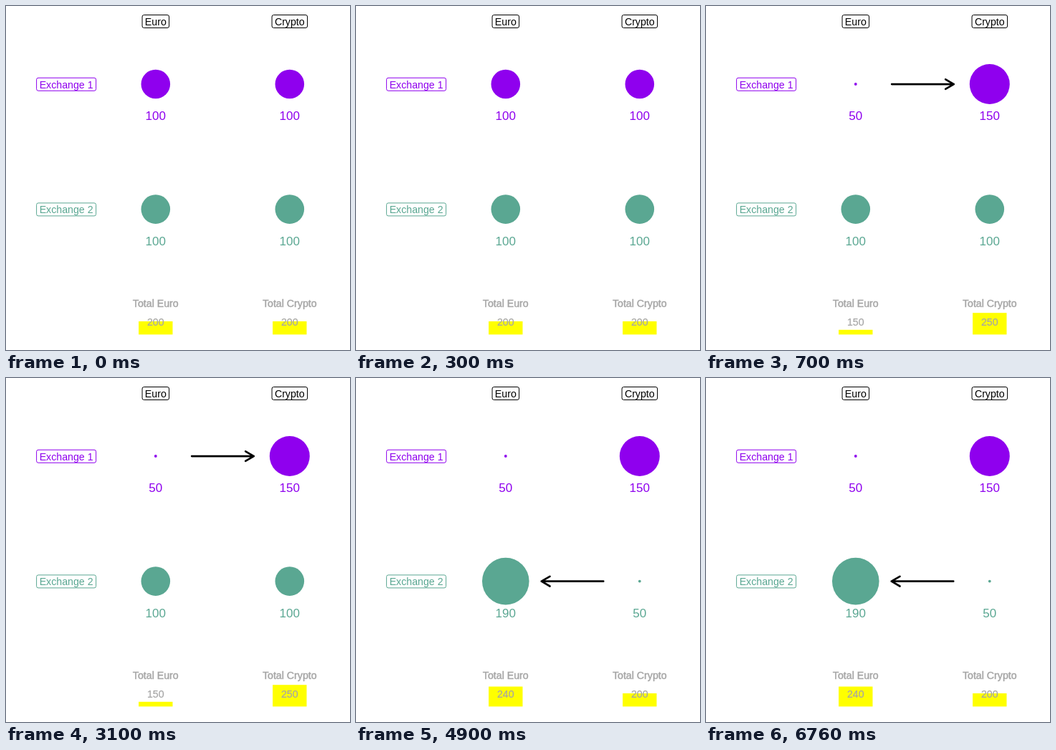
An HTML page that plays this animation: 480x480 px, repeating every 8000 ms.

```html
<!DOCTYPE html>
<html lang="en">
<head>
<meta charset="utf-8">
<style>
html, body { margin: 0; height: 100%; overflow: hidden; background: #fff; }
svg { display: block; width: 480px; height: 480px; }
text { font: 14.2px "Liberation Sans", Arial, sans-serif; text-anchor: middle; }
.amount { font-size: 17px; }
.total { fill: #a6a6a6; stroke: #a6a6a6; stroke-width: .2; }
.heading { stroke-width: .45; }
.arrow { fill: none; stroke-linecap: round; stroke-linejoin: round; }
</style>
</head>
<body>
<svg viewBox="0 0 480 480"><g id="labels"></g><g id="scene"></g></svg>
<script>
const PURPLE = '#8f00ee', TEAL = '#5aa792';
const COLS = [208.8, 395.8];
const ROWS = [{ y: 109, color: PURPLE }, { y: 283.6, color: TEAL }];
const RADIUS = { 50: 1.9, 75: 14.9, 100: 20.3, 125: 24.5, 145: 27.5, 150: 28, 190: 32.8 };

// Amounts: [exchange 1 euro, crypto, exchange 2 euro, crypto]; arrows: 0 off, 1 fading, 2 full
const STATES = [
  { start: 0,    amounts: [100, 100, 100, 100], arrows: [0, 0] },
  { start: 500,  amounts: [75, 125, 100, 100],  arrows: [1, 0] },
  { start: 700,  amounts: [50, 150, 100, 100],  arrows: [2, 0] },
  { start: 4700, amounts: [50, 150, 145, 75],   arrows: [1, 1] },
  { start: 4900, amounts: [50, 150, 190, 50],   arrows: [0, 2] },
];
const LOOP = 8000;

const text = (x, y, str, cls, fill = '') =>
  `<text x="${x}" y="${y}" class="${cls}" ${fill && `fill="${fill}"`}>${str}</text>`;

const tag = (x, y, w, str, color) =>
  `<rect x="${x - w / 2}" y="${y - 9.2}" width="${w}" height="18" rx="2.5" fill="none" stroke="${color}"/>` +
  text(x, y + 5.2, str, '', color);

function arrow(row, level) {
  if (!level) return '';
  const y = ROWS[row].y + .1;
  const [tail, tip, back] = row ? [345.2, 258.8, 270.5] : [259.2, 345.8, 334.2];
  const style = level > 1 ? 'stroke="#000" stroke-width="2.7"' : 'stroke="#101010" stroke-width="2.3"';
  return `<path class="arrow" ${style} d="M${tail} ${y}H${tip}M${back} ${y - 6.8}L${tip} ${y}L${back} ${y + 6.8}"/>`;
}

function bar(x, total) {
  const h = 18.4 + (total - 200) * .236;
  return `<rect x="${x - 23.7}" y="${458.4 - h}" width="47.4" height="${h}" fill="#ff0"/>` +
    text(x, 446, total, 'total');
}

function scene({ amounts, arrows }) {
  const holdings = amounts.map((amount, i) => {
    const x = COLS[i % 2], { y, color } = ROWS[i >> 1];
    return `<circle cx="${x}" cy="${y}" r="${RADIUS[amount]}" fill="${color}"/>` +
      text(x, y + 50.2, amount, 'amount', color);
  });
  const totals = COLS.map((x, i) => bar(x, amounts[i] + amounts[i + 2]));
  return [...holdings, ...arrows.map((level, row) => arrow(row, level)), ...totals].join('');
}

labels.innerHTML =
  tag(COLS[0], 21.7, 37.5, 'Euro', '#000') + tag(COLS[1], 21.7, 49.5, 'Crypto', '#000') +
  ROWS.map(({ y, color }, i) => tag(84.1, y + .5, 83, `Exchange ${i + 1}`, color)).join('') +
  ['Euro', 'Crypto'].map((name, i) => text(COLS[i], 420.2, `Total ${name}`, 'total heading')).join('');

const sceneNode = document.getElementById('scene');
const began = performance.now();
let shown;
function draw() {
  const t = (performance.now() - began) % LOOP;
  const state = STATES.filter(s => s.start <= t).pop();
  if (state !== shown) sceneNode.innerHTML = scene(shown = state);
  requestAnimationFrame(draw);
}
draw();
</script>
</body>
</html>
```
